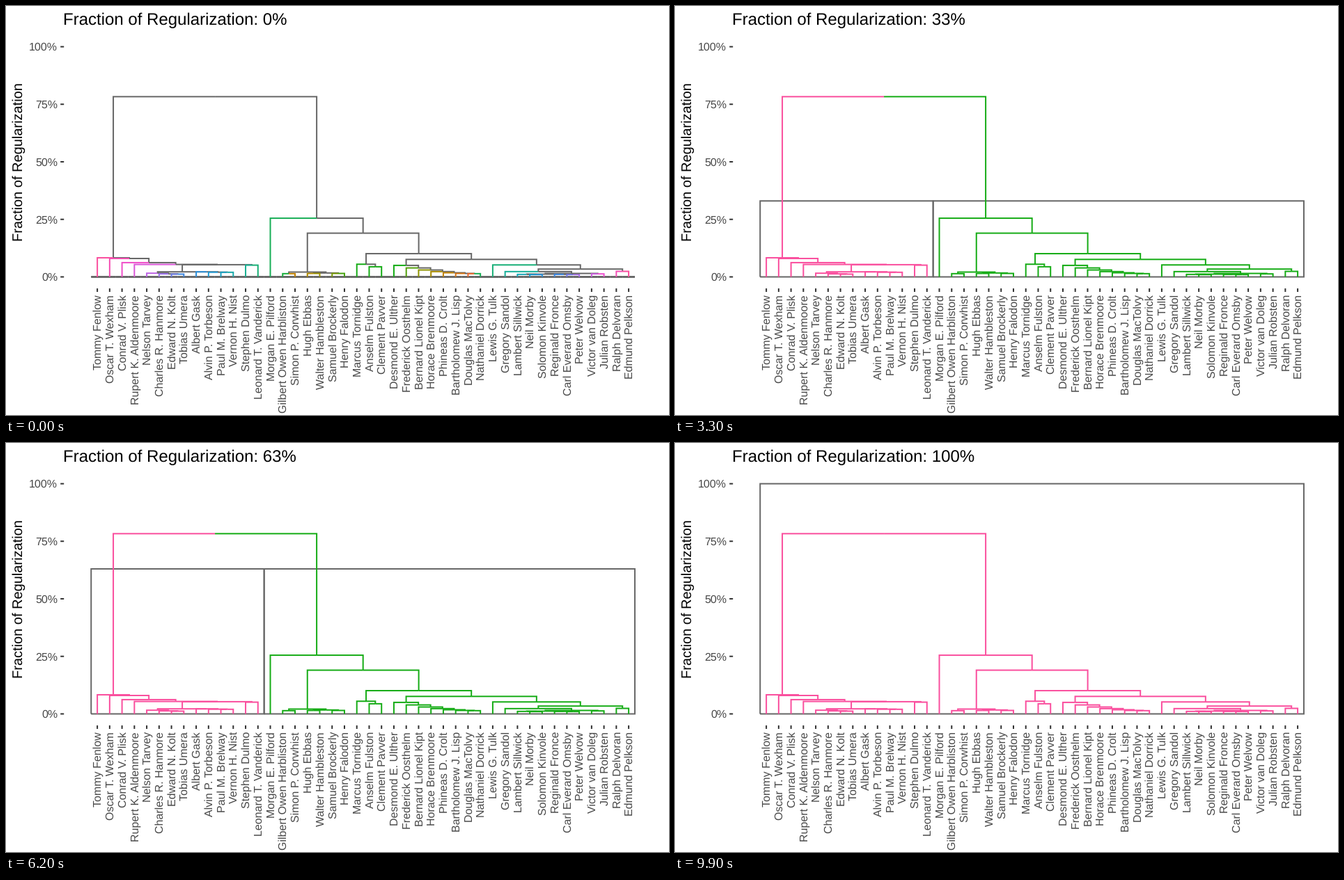
These frames come from a looping animation (952x588 px, 10000 ms). A matplotlib script:

```python
import matplotlib.pyplot as plt
import numpy as np
from matplotlib.animation import FuncAnimation
from matplotlib.collections import LineCollection
from matplotlib.colors import LinearSegmentedColormap

W, H, DPI = 952, 588, 100
PX = 72 / DPI
FRAMES = 100

# Panel box, with 5% padding around the data on every side.
LEFT, RIGHT, TOP, BOTTOM = 83.2, 942, 42, 406
PAD = 0.05 / 1.1
GREY, INK = "#676767", "#484848"

plt.rcParams.update({"font.family": "Liberation Sans", "text.hinting": "none"})

NAMES = [
    "Tommy Fenlow", "Oscar T. Wexham", "Conrad V. Plisk",
    "Rupert K. Aldenmoore", "Nelson Tarvey", "Charles R. Hanmore",
    "Edward N. Kolt", "Tobias Umera", "Albert Gask", "Alvin P. Torbeson",
    "Paul M. Brelway", "Vernon H. Nist", "Stephen Dulmo",
    "Leonard T. Vanderick", "Morgan E. Pilford", "Gilbert Owen Harbliston",
    "Simon P. Corwhist", "Hugh Ebbas", "Walter Hambleston",
    "Samuel Brockerly", "Henry Falodon", "Marcus Tornidge",
    "Anselm Fulston", "Clement Pavver", "Desmond E. Ulther",
    "Frederick Oosthelm", "Bernard Lionel Kipt", "Horace Brenmoore",
    "Phineas D. Crolt", "Bartholomew J. Lisp", "Douglas MacTolvy",
    "Nathaniel Dorrick", "Lewis G. Tulk", "Gregory Sandol",
    "Lambert Sillwick", "Neil Morby", "Solomon Kinvole",
    "Reginald Fronce", "Carl Everard Omsby", "Peter Welvow",
    "Victor van Doleg", "Julian Robsten", "Ralph Delvoran", "Edmund Pelkson",
]
COUNT = len(NAMES)


def x_of(leaf):
    x0, x1 = LEFT + PAD * (RIGHT - LEFT), RIGHT - PAD * (RIGHT - LEFT)
    return x0 + (x1 - x0) * (leaf + .5) / COUNT


def y_of(pct):
    y0, y1 = BOTTOM - PAD * (BOTTOM - TOP), TOP + PAD * (BOTTOM - TOP)
    return y0 + (y1 - y0) * pct / 100


# A merge is (height in percent, left, right); 0 is a leaf.
def chain(heights, tail=0):
    """Join one leaf after another to the left of tail."""
    for h in reversed(heights):
        tail = (h, 0, tail)
    return tail


def ease(high, low, n):
    return low + (high - low) * np.linspace(1, 0, n) ** 2


def pair(h):
    return h, 0, 0


MODERN = chain([8.3, 8, 6.2, 5.4], (
    5.3, (2.2, chain(ease(1.6, 1.2, 3)), chain(ease(2.2, 2, 3))), pair(5.1)))
EARLY = (2.1, pair(1.4), (1.7, pair(1.5), pair(1.5)))
MIDDLE = (7.6, chain(ease(5, 1.4, 7)), chain([5.2], (
    3.4,
    chain([2.3], (1.5, (1.2, chain([1.1, 1]), chain([1.1, 1])), pair(1.3))),
    pair(2.4))))
TREE = (78.3, MODERN, chain([25.5], (
    19, EARLY, (10.1, chain([5.5, 4.4]), MIDDLE))))

PALETTE = LinearSegmentedColormap.from_list("hues", [
    "#EA6A2E", "#C28200", "#8F9400", "#16AC16", "#18AE55", "#18B09A",
    "#1A9BD0", "#3A86E0", "#A86BEE", "#EE4FD0", "#FA4F9E"], N=1024)
ORANGE, GREEN, PINK = 0, 3, 10

# Hues run between a few turning points along the leaves.
TONES = np.interp(range(COUNT), [0, 15, 16, 21, 24, 30, 31, 43],
                  [PINK, 3.6, 1, GREEN, GREEN, ORANGE, 4, PINK])
GROUP_TONES = {14: GREEN, 15: ORANGE}


class Node:
    def __init__(self, spec, first=0, parent=None):
        self.parent, self.first = parent, first
        self.kids = []
        if spec:
            self.h, left, right = spec
            a = Node(left, first, self)
            b = Node(right, a.last + 1, self)
            self.kids = [a, b]
            self.last, self.x = b.last, (a.x + b.x) / 2
        else:
            self.h, self.last, self.x = 0, first, x_of(first)

    def walk(self):
        yield self
        for kid in self.kids:
            yield from kid.walk()

    def color(self):
        tone = TONES[self.first]
        if self.last - self.first > COUNT / 2:
            tone = GROUP_TONES.get(self.first, tone)
        return PALETTE(tone / PINK)


def clusters(node, cut):
    if node.h <= cut:
        return [node]
    return [c for kid in node.kids for c in clusters(kid, cut)]


def edge(node):
    top = y_of(node.parent.h)
    return [(node.parent.x, top), (node.x, top), (node.x, y_of(node.h))]


def box(node, cut):
    x0, x1 = x_of(node.first - .5), x_of(node.last + .5)
    base, top = y_of(0), y_of(cut)
    return [(x0, base), (x0, top), (x1, top), (x1, base), (x0, base)]


root = Node(TREE)
branches = [n for n in root.walk() if n.parent]

fig = plt.figure(figsize=(W / DPI, H / DPI), dpi=DPI, facecolor="white")
ax = fig.add_axes([0, 0, 1, 1])
ax.set(xlim=(0, W), ylim=(H, 0))
ax.axis("off")


def label(x, y, text, size, color, **kw):
    return ax.text(x, y, text, fontsize=size * PX, color=color,
                   va="baseline", rotation_mode="anchor", **kw)


def lines(segments, color, z):
    art = LineCollection(segments, colors=color, linewidths=2 * PX, zorder=z)
    art.set_capstyle("butt")
    art.set_joinstyle("miter")
    art.set_snap(False)
    return ax.add_collection(art, autolim=False)


title = label(82.5, 27.5, "", 24, "black")
label(23.8, (TOP + BOTTOM) / 2, "Fraction of Regularization", 20, "black",
      rotation=90, ha="center")

ticks = []
for pct in range(0, 101, 25):
    y = y_of(pct)
    label(LEFT - 9, y + 5.7, f"{pct}%", 16, INK, ha="right")
    ticks.append([(LEFT - 5, y), (LEFT, y)])
for i, name in enumerate(NAMES):
    x = x_of(i)
    label(x + 6, BOTTOM + 9, name, 16, INK, rotation=90, ha="right")
    ticks.append([(x, BOTTOM), (x, BOTTOM + 5)])
lines(ticks, "#333333", 1)

boxes = lines([], GREY, 2)
dendro = lines([edge(n) for n in branches], GREY, 3)


def update(i):
    cut = round(i * 100 / (FRAMES - 1))
    groups = clusters(root, cut)
    owner = {n: g.color() for g in groups for n in g.walk()}
    title.set_text(f"Fraction of Regularization: {cut}%")
    boxes.set_segments([box(g, cut) for g in groups])
    dendro.set_color([owner.get(n, GREY) for n in branches])
    return title, boxes, dendro


anim = FuncAnimation(fig, update, frames=FRAMES, interval=100,
                     repeat=True, repeat_delay=0, blit=False)
plt.show()
```
